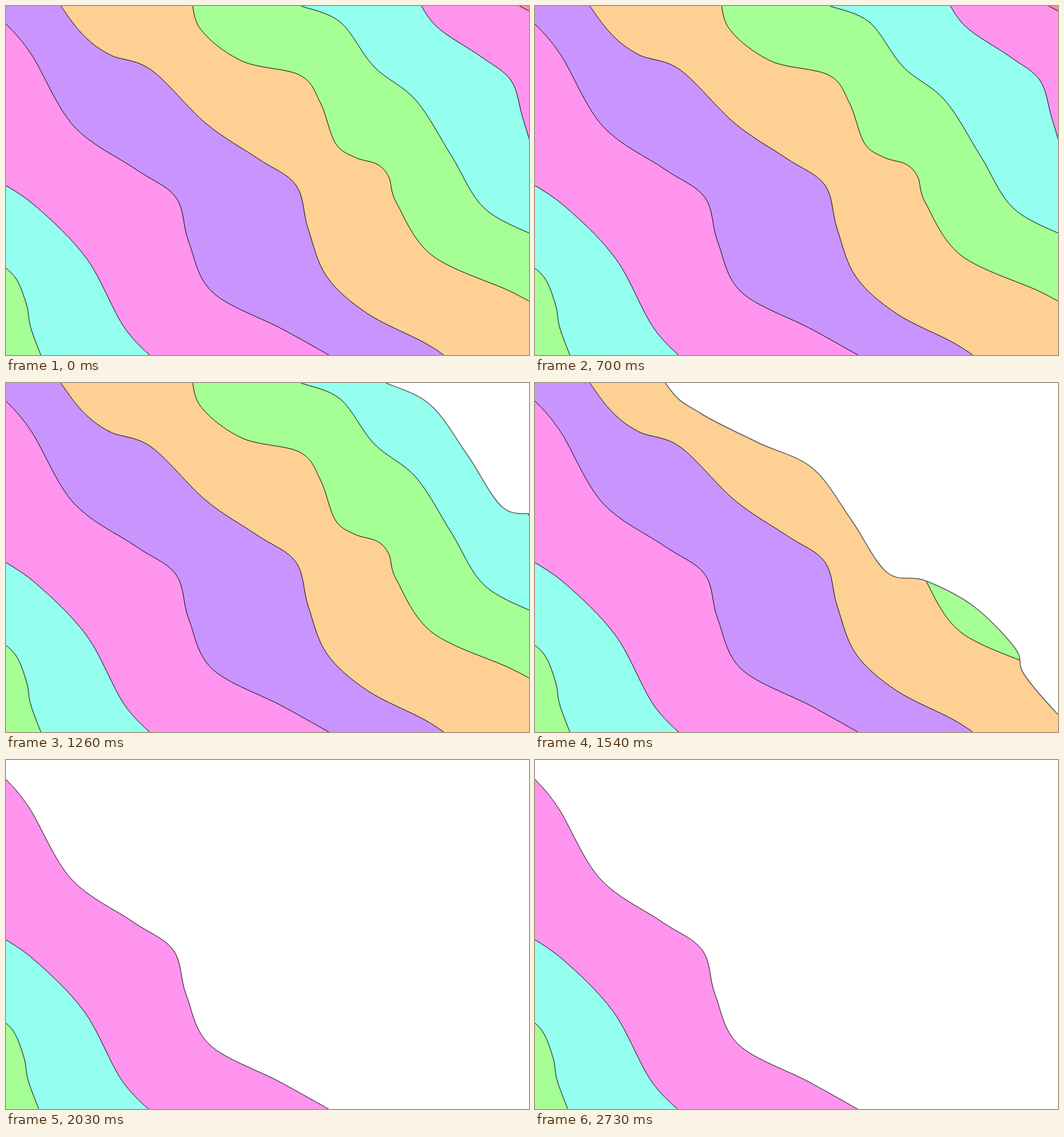
Animation of 810 by 540 pixels, one loop 2.8 s. Source, as an HTML page with a canvas:

```html
<!DOCTYPE html>
<html lang="en">
<head>
<meta charset="utf-8">
<title>Waves</title>
<style>
html, body { margin: 0; width: 100%; height: 100%; overflow: hidden; background: #fff; }
canvas { display: block; }
</style>
</head>
<body>
<canvas id="stage" width="810" height="540"></canvas>
<script>
const ctx = document.getElementById('stage').getContext('2d');
const STEP = 70, LOOP = 2800;
const SWEEP = { x: -56.25, y: 25, anchor: 22 };  // white sheet, pixels per step
const SETTLE = { x: -4, y: -2, from: 26 };       // front bands, once the sheet has passed
const PINK = '#ff94ee', CYAN = '#94ffee', GREEN = '#a6ff94',
      ORANGE = '#ffd094', PURPLE = '#ca94ff', SALMON = '#ff9494';

const parse = text => text.split(' ').map(p => p.split(',').map(Number));

// Smooth curve through a few key points
function curve(points) {
  const path = new Path2D();
  path.moveTo(...points[0]);
  for (let i = 0; i < points.length - 1; i++) {
    const b = points[i], c = points[i + 1];
    const a = points[i - 1] || b, d = points[i + 2] || c;
    path.bezierCurveTo(
      b[0] + (c[0] - a[0]) / 6, b[1] + (c[1] - a[1]) / 6,
      c[0] - (d[0] - b[0]) / 6, c[1] - (d[1] - b[1]) / 6, ...c);
  }
  return path;
}

// A filled area whose visible edge is a wavy line
function wave(color, keys, corners = '900,700 -100,700 -100,-100') {
  const edge = curve(parse(keys)), area = new Path2D(edge);
  parse(corners).forEach(p => area.lineTo(...p));
  area.closePath();
  return { color, edge, area };
}

const back = [
  wave(PINK, '780,-8 830,18'),
  wave(CYAN, '630,-25 665,30 735,78 782,115 800,172 818,232'),
  wave(GREEN, '440,-6 457,0 518,25 570,94 635,146 690,232 742,314 830,360'),
  wave(ORANGE, '287,-25 300,34 365,85 455,107 487,150 510,212 540,234 575,245 593,265 605,305 660,386 780,441 830,468'),
  wave(PURPLE, '70,-22 115,40 160,75 225,99 310,182 390,236 449,277 468,345 497,419 560,476 650,522 700,556')
];
const front = [
  wave(PINK, '-20,14 0,28 40,76 105,186 200,252 263,296 283,365 320,443 430,501 530,557'),
  wave(CYAN, '-20,266 45,309 125,391 185,500 245,560'),
  wave(GREEN, '-15,394 15,421 32,463 39,500 62,560')
];
const sheet = wave('#fff',
  '120,-150 202,0 255,46 345,92 430,132 490,212 545,293 605,306 680,346 744,411 757,450 810,513 860,560',
  '3000,2200 3000,-2000 -800,-2000');

function paint({ color, edge, area }, x = 0, y = 0, line = '#000', width = 0.9) {
  ctx.save();
  ctx.translate(x, y);
  ctx.fillStyle = color;
  ctx.fill(area);
  ctx.strokeStyle = line;
  ctx.lineWidth = width;
  ctx.stroke(edge);
  ctx.restore();
}

function draw() {
  const step = Math.floor(performance.now() % LOOP / STEP);
  const swept = step - SWEEP.anchor;
  const settled = step >= SETTLE.from ? 1 : 0;
  ctx.fillStyle = SALMON;
  ctx.fillRect(0, 0, 810, 540);
  back.forEach(w => paint(w));
  paint(sheet, swept * SWEEP.x, swept * SWEEP.y, '#666', 1.5);
  front.forEach(w => paint(w, settled * SETTLE.x, settled * SETTLE.y));
  requestAnimationFrame(draw);
}
draw();
</script>
</body>
</html>
```
